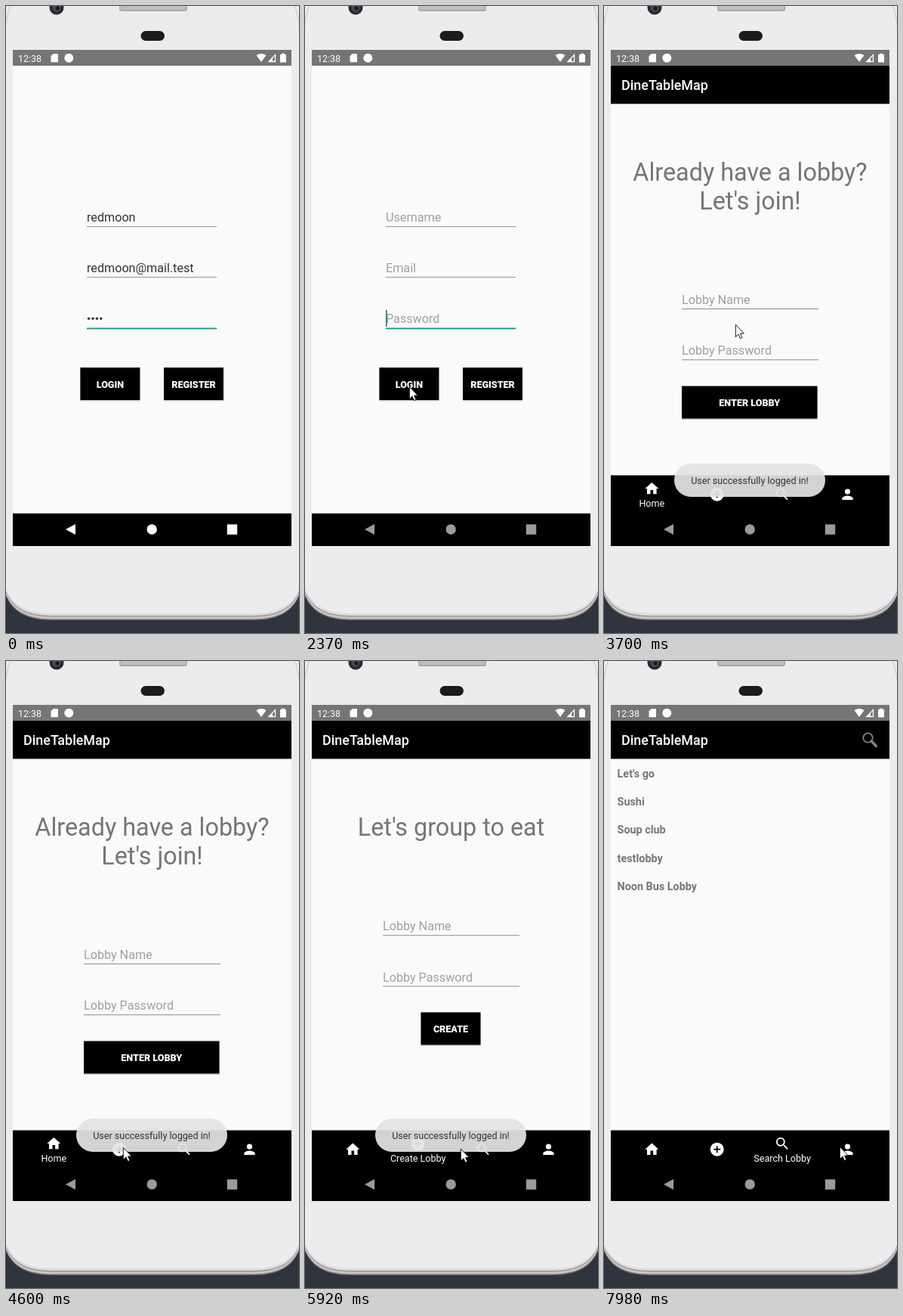
An HTML page for the animation above (8000 ms loop, 388 by 829 pixels).

```html
<!DOCTYPE html>
<html lang="en">
<head>
<meta charset="utf-8">
<title>Lobby app demo</title>
<style>
html, body { margin: 0; width: 100%; height: 100%; overflow: hidden; background: #30343f; }
svg { display: block; width: 388px; height: 829px; font-family: Roboto, sans-serif; }
.value, .hint { font-size: 16.16px; }
.value { fill: #333; }
.hint { fill: #a0a0a0; }
.btn { font-size: 12.57px; font-weight: 900; fill: #fff; text-anchor: middle; }
.head { font-size: 32.33px; fill: #757575; text-anchor: middle; }
.title { font-size: 17.96px; font-weight: 500; fill: #fff; }
.label { font-size: 12.57px; fill: #fff; text-anchor: middle; }
.row { font-size: 14.37px; font-weight: 700; fill: #757575; }
</style>
</head>
<body>
<svg id="stage" viewBox="0 0 388 829"></svg>
<script>
const LOOP = 8000;
const TICK = 108; // the screen refreshes about nine times a second
const stage = document.getElementById('stage');

// pointer moves: start and end time, then where the tip arrives
const START = [309, 87];
const MOVES = [
  [200, 970, 138, 503],
  [3370, 3672, 174, 421],
  [3672, 3920, 175, 385],
  [3920, 4450, 155, 643],
  [5360, 5580, 163, 650],
  [5580, 6260, 242, 640],
  [7660, 7990, 312, 642]
];

const ICONS = {
  'Home': 'M10 20v-6h4v6h5v-8h3L12 3 2 12h3v8z',
  'Create Lobby': 'M12 2a10 10 0 1 0 0 20 10 10 0 0 0 0-20zm5 11h-4v4h-2v-4H7v-2h4V7h2v4h4z',
  'Search Lobby': 'M15.5 14h-.79l-.28-.27A6.5 6.5 0 1 0 13.73 14.43l.27.28v.79l5 4.99L20.49 19zm-6 0a4.5 4.5 0 1 1 0-9 4.5 4.5 0 0 1 0 9z',
  'Profile': 'M12 12a4 4 0 1 0 0-8 4 4 0 0 0 0 8zm0 2c-2.67 0-8 1.34-8 4v2h16v-2c0-2.66-5.33-4-8-4z'
};
const ROWS = ["Let's go", 'Sushi', 'Soup club', 'testlobby', 'Noon Bus Lobby'];

const rect = (x, y, w, h, fill, more = '') =>
  `<rect x="${x}" y="${y}" width="${w}" height="${h}" fill="${fill}" ${more}/>`;
const band = (y, end, fill) => rect(9, y, 369, end - y, fill);
const text = (cls, x, y, s) => `<text class="${cls}" x="${x}" y="${y}">${s}</text>`;
const line = (x, y, w) => rect(x, y, w, 1, '#8c8c8c');
const button = (x, y, w, s) =>
  rect(x, y + 1, w, 43.3, '#000', 'opacity=".22"') +
  rect(x, y, w, 43, '#000') + text('btn', x + w / 2, y + 26.5, s);
const field = (y, s) => text('hint', 103, y, s) + line(103, y + 6, 181);
const rim = (dy, fill) =>
  `<path transform="translate(0 ${dy})" fill="${fill}" d="M-5 752C0 785 18 803 60 803H328C370 803 388 785 393 752V-20H-5Z"/>`;

const phone = rect(0, 0, 388, 829, '#30343f') +
  rim(9, '#77757a') + rim(7.5, '#c9c5c5') + rim(4.5, '#9b9898') + rim(3, '#dedcdc') + rim(0, '#ebecee') +
  `<path d="M-1 30Q1 12 6 -1M389 30Q387 12 382 -1" fill="none" stroke="#d0d0d2" stroke-width="1.5"/>
  <circle cx="67" cy="2" r="9.5" fill="#2b2b2d"/><circle cx="67" cy="2" r="5.5" fill="#4a4b50"/>
  <circle cx="68" cy="3" r="2.5" fill="#17181b"/>
  <rect x="150" y="-8" width="90" height="15" rx="3" fill="#a9a9ab"/>
  <rect x="151.5" y="-8" width="87" height="13" rx="2" fill="#c0bfc0"/>
  <rect x="178.5" y="33" width="31.5" height="13" rx="6.5" fill="#1b1b1c"/>`;

const dots = [0, 1, 2, 3].map(i => `<circle cx="${109.6 + 5.4 * i}" cy="413.3" r="1.7" fill="#333"/>`).join('');
const login = band(58, 672, '#fafafa') + band(670.9, 715, '#000') +
  `<g id="filled">${text('value', 107, 285, 'redmoon')}${text('value', 107, 352, 'redmoon@mail.test')}${dots}</g>
  <g id="empty">${['Username', 'Email', 'Password'].map((s, i) => text('hint', 107, 285 + 67 * i, s)).join('')}</g>` +
  line(107, 291.2, 172) + line(107, 358.2, 172) + rect(107, 425.5, 172, 1.8, '#189482') +
  rect(0, 402, 1.6, 22, '#16806f', 'id="caret"') +
  button(98.4, 478, 79, 'LOGIN') + button(209, 478, 79, 'REGISTER');

const home = text('head', 193.5, 231, 'Already have a lobby?') + text('head', 193.5, 269, "Let's join!") +
  field(394, 'Lobby Name') + field(461.3, 'Lobby Password') + button(103, 502.5, 179.5, 'ENTER LOBBY');
const create = text('head', 193.5, 231, "Let's group to eat") +
  field(356.3, 'Lobby Name') + field(423.5, 'Lobby Password') + button(153.5, 464.5, 79, 'CREATE');
const list = `<g id="rows">${ROWS.map((s, i) => text('row', 17.6, 153.8 + 37.25 * i, s)).join('')}</g>
  <g fill="none" stroke="#858585"><circle cx="349.5" cy="101.5" r="6.2" stroke-width="1.8"/>
  <path d="M354 106L360.5 112.5" stroke-width="3.2" stroke-linecap="round"/></g>`;

const tabs = Object.entries(ICONS).map(([name, d], i) => {
  const x = 63.3 + 86.4 * i;
  return `<g id="icon${i}"><path fill="#fff" fill-rule="evenodd"
    transform="translate(${x - 10.78} -10.78) scale(.898)" d="${d}"/></g>
    <g id="label${i}">${text('label', x, 661.7, name)}</g>`;
}).join('');

const app = band(58, 79, '#757575') + band(79, 130, '#000') +
  band(129.4, 621, '#fafafa') + band(620.5, 715, '#000') +
  text('title', 23, 111.3, 'DineTableMap') +
  `<g id="page0">${home}</g><g id="page1">${create}</g><g id="page2">${list}</g>
  <circle id="ripple" cx="242" cy="641" r="12" fill="#fff"/>` + tabs;

const bars = band(58, 79, '#757575') + `<g fill="#fff">
  <text x="16" y="73.6" font-size="12.5">12:38</text>
  <path d="M62.5 63.3H69V74.3H59.5V66.3Z"/><circle cx="83.3" cy="68.8" r="6"/>
  <path d="M331.5 65.2Q338 60.6 344.5 65.2L338 74Z"/><path d="M364.8 64.2V62.8H369.2V64.2H371V74.5H363V64.2Z"/>
  <path d="M348 73.5H356.5V64.6Z" fill="none" stroke="#fff" stroke-width="1.3"/><path d="M347 74H353V67.8Z"/></g>` +
  band(684, 714, '#000') +
  `<g id="keys"><path d="M79 692L92 685V699Z"/><circle cx="193.2" cy="692" r="6.7"/><rect x="292.8" y="685.4" width="13.4" height="13.4"/></g>`;

stage.innerHTML = phone +
  `<clipPath id="screen">${band(58, 714, '#000')}</clipPath>
  <g clip-path="url(#screen)"><g id="login">${login}</g>
  ${rect(9, 58, 369, 656, '#000', 'id="shade"')}<g id="app">${app}</g>${bars}</g>
  <g id="toast"><rect x="93" y="605" width="200" height="44" rx="22" fill="#e4e4e4" opacity=".93"/>
  <text x="193" y="632.3" font-size="12.57" text-anchor="middle" fill="#333">User successfully logged in!</text></g>
  <path id="pointer" fill="#fff" stroke="#000" stroke-width=".9" d="M.3.3V16.5L4 13 6.5 18.6 9 17.5 6.6 12H11.4Z"/>`;

const $ = {};
stage.querySelectorAll('[id]').forEach(e => $[e.id] = e);
const set = (id, name, v) => $[id].setAttribute(name, v);
const show = (id, on) => set(id, 'opacity', +on);
const ramp = (t, a, b) => Math.min(1, Math.max(0, (t - a) / (b - a)));
const smooth = k => k * k * (3 - 2 * k);
const zoom = s => `translate(193.5 386) scale(${s}) translate(-193.5 -386)`;

function pointerAt(t) {
  let [x, y] = START;
  for (const [a, b, toX, toY] of MOVES) {
    const k = smooth(ramp(t, a, b));
    x += (toX - x) * k;
    y += (toY - y) * k;
  }
  return [x, y];
}

function draw(time) {
  const t = Math.floor((time + 20) / TICK) * TICK;

  // login form
  const cleared = t >= 2365;
  show('filled', !cleared);
  show('empty', cleared);
  set('caret', 'x', cleared ? 107 : 128);
  show('caret', cleared || t >= 120 && Math.floor((t - 120) / 500) % 2 === 0);
  const grey = Math.round(255 - 101 * ramp(t, 1000, 2160));
  set('keys', 'fill', `rgb(${grey},${grey},${grey})`);

  // the app window opens over the form
  const open = 1 - Math.pow(1 - ramp(t, 2768, 3130), 5);
  set('login', 'transform', zoom(1 + .15 * open));
  show('login', t < 3130);
  set('shade', 'opacity', .32 * open);
  set('app', 'transform', zoom(.85 + .15 * open));
  set('app', 'opacity', ramp(t, 2790, 2840));

  // tabs
  const page = t < 4690 ? 0 : t < 7215 ? 1 : 2;
  for (let i = 0; i < 3; i++) show('page' + i, i === page);
  show('rows', t >= 7325);
  const toCreate = ramp(t, 4630, 4780), toSearch = ramp(t, 7160, 7300);
  [1 - toCreate, toCreate - toSearch, toSearch, 0].forEach((on, i) => {
    set('icon' + i, 'transform', `translate(0 ${645.7 - 7.6 * on})`);
    set('label' + i, 'opacity', on);
  });
  set('ripple', 'opacity', t < 7010 ? 0 : .22 * (1 - ramp(t, 7100, 7320)));

  set('toast', 'opacity', ramp(t, 2600, 2820) * (1 - ramp(t, 6050, 6250)));
  const [x, y] = pointerAt(t);
  set('pointer', 'transform', `translate(${x} ${y})`);
  show('pointer', t >= 210);
}

function tick(now) {
  draw(now % LOOP);
  requestAnimationFrame(tick);
}
draw(0);
requestAnimationFrame(tick);
</script>
</body>
</html>
```
